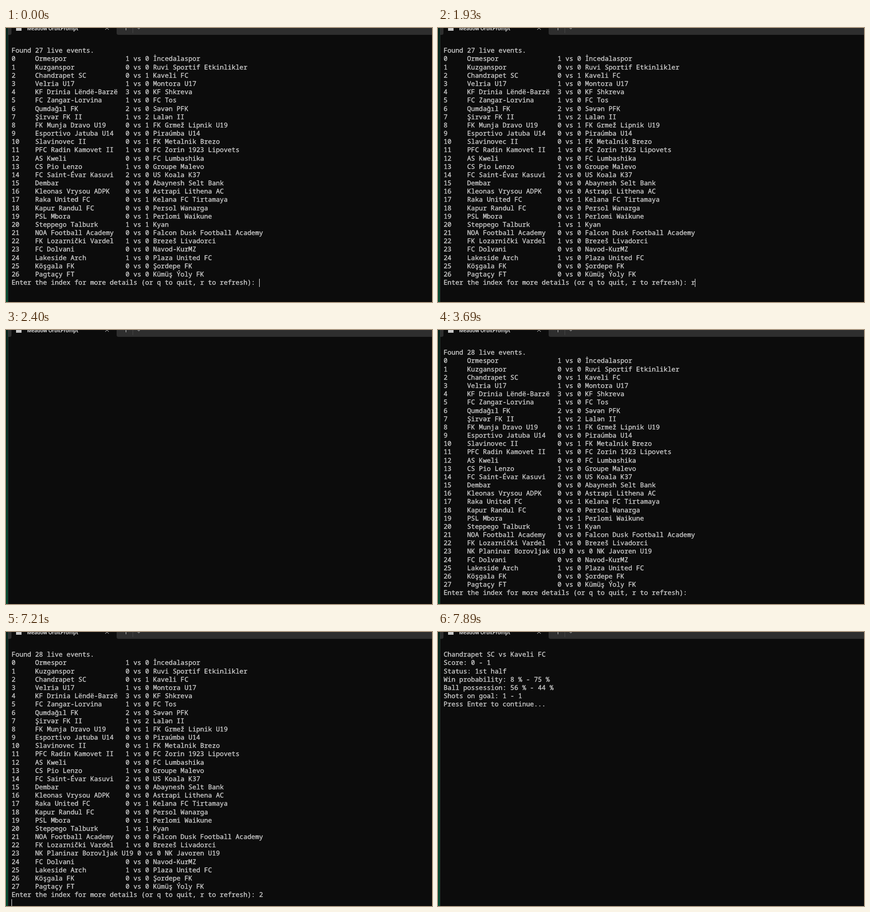
Write an HTML page that moves like this. It is 932 by 601 pixels and loops after 8000 ms.

```html
<!DOCTYPE html>
<html lang="en">
<head>
<meta charset="utf-8">
<title>Live events terminal</title>
<style>
  html, body { margin: 0; width: 100%; height: 100%; overflow: hidden; background: #0c0c0c; }
  #stage { position: relative; width: 932px; height: 601px; overflow: hidden; }
  #chrome { position: absolute; left: 0; top: 0; }
  #screen {
    position: absolute; left: 12.2px; top: 41.3px; margin: 0; color: #ccc;
    font: 14.34px/18.17px "Noto Sans Mono", "DejaVu Sans Mono", monospace;
    -webkit-text-stroke: .4px #ccc;
    text-rendering: geometricPrecision; font-variant-ligatures: none;
  }
  #caret { position: absolute; width: 1px; height: 18px; background: #fff; }
</style>
</head>
<body>
<div id="stage">
  <svg id="chrome" width="932" height="601">
    <defs>
      <linearGradient id="edge" x2="0" y2="1">
        <stop offset="0" stop-color="#04231a"/>
        <stop offset=".35" stop-color="#042c1e"/>
        <stop offset=".6" stop-color="#053c28"/>
        <stop offset="1" stop-color="#044a30"/>
      </linearGradient>
    </defs>
    <rect width="4" height="601" fill="url(#edge)"/>
    <rect x="4" width="1" height="601" fill="#2b3a34"/>
    <path d="M5 0H12V11Q12 15 8 15H5ZM242 0H932V15H246Q242 15 242 11Z" fill="#2e2e2e"/>
    <rect x="22" y="-6" width="12" height="12" fill="#c8c8c8"/>
    <text x="46" y="5" fill="#fff" font-size="10.7" font-weight="600"
      font-family="'Open Sans', 'Noto Sans', sans-serif">Meadow OrbitPrompt</text>
    <g fill="none" stroke="#ddd">
      <path d="M217-4 225 4M225-4 217 4M262.5-4V5M287-1 290.5 2 294-1"/>
      <path d="M277.5 0V11" stroke="#484848"/>
    </g>
  </svg>
  <pre id="screen"></pre>
  <div id="caret"></div>
</div>
<script>
const LOOP = 8000, CELL = 8.603, ROW = 18.17;

const matches = `Ormespor|1 vs 0|İncedalaspor
Kuzganspor|0 vs 0|Ruvi Sportif Etkinlikler
Chandrapet SC|0 vs 1|Kaveli FC
Velria U17|1 vs 0|Montora U17
KF Drinia Lëndë-Barzë|3 vs 0|KF Shkreva
FC Zangar-Lorvina|1 vs 0|FC Tos
Qumdağıl FK|2 vs 0|Səvən PFK
Şirvər FK II|1 vs 2|Lalən II
FK Munja Dravo U19|0 vs 1|FK Grmež Lipnik U19
Esportivo Jatuba U14|0 vs 0|Piraúmba U14
Slavinovec II|0 vs 1|FK Metalnik Brezo
PFC Radin Kamovet II|1 vs 0|FC Zorin 1923 Lipovets
AS Kweli|0 vs 0|FC Lumbashika
CS Pio Lenzo|1 vs 0|Groupe Malevo
FC Saint-Évar Kasuvi|2 vs 0|US Koala K37
Dembar|0 vs 0|Abaynesh Selt Bank
Kleonas Vrysou ADPK|0 vs 0|Astrapi Lithena AC
Raka United FC|0 vs 1|Kelana FC Tirtamaya
Kapur Randul FC|0 vs 0|Persol Wanarga
PSL Mbora|0 vs 1|Perlomi Waikune
Steppego Talburk|1 vs 1|Kyan
NOA Football Academy|0 vs 0|Falcon Dusk Football Academy
FK Lozarnički Vardel|1 vs 0|Brezeš Livadorci
FC Dolvani|0 vs 0|Navod-KurMZ
Lakeside Arch|1 vs 0|Plaza United FC
Köşgala FK|0 vs 0|Şordepe FK
Pagtaçy FT|0 vs 0|Kümüş Ýoly FK`.split("\n");

const lateMatch = "NK Planinar Borovljak U19|0 vs 0|NK Javoren U19";

function listScreen(rows) {
  const lines = rows.map((row, i) => {
    const [home, score, away] = row.split("|");
    return `${String(i).padEnd(6)}${home.padEnd(22)} ${score} ${away}`;
  });
  return [`Found ${rows.length} live events.`, ...lines,
    "Enter the index for more details (or q to quit, r to refresh): "].join("\n");
}

const before = listScreen(matches);
const after = listScreen([...matches.slice(0, 23), lateMatch, ...matches.slice(23)]);
const details = `Chandrapet SC vs Kaveli FC
Score: 0 - 1
Status: 1st half
Win probability: 8 % - 75 %
Ball possession: 56 % - 44 %
Shots on goal: 1 - 1
Press Enter to continue...`;

// Start time and terminal contents; the caret always follows the last character.
const scenes = [
  [0, before], [1930, before + "r"], [2130, ""], [2600, after],
  [6150, after + "2"], [6680, after + "2\n"], [7280, ""], [7350, details]
];

// Times at which the caret switches between shown and hidden.
const blinks = [
  250, 470, 670, 870, 1070, 1270, 1470, 1670, 2400, 2600, 2870, 3080, 3280, 3490,
  3690, 3950, 4165, 4380, 4595, 4810, 5010, 5280, 5480, 5680, 5880, 6080, 6480,
  6680, 7010, 7210, 7420, 7690, 7890
];

const screenEl = document.getElementById("screen");
const caret = document.getElementById("caret");
let shown = null;

function draw(now) {
  const t = now % LOOP;
  const text = scenes.findLast(([start]) => start <= t)[1];
  if (text !== shown) {
    screenEl.textContent = shown = text;
    const lines = text.split("\n");
    caret.style.left = Math.floor(12.4 + lines.at(-1).length * CELL) + "px";
    caret.style.top = Math.round(41 + (lines.length - 1) * ROW) + "px";
  }
  const flips = blinks.filter(time => time <= t).length;
  caret.style.visibility = flips % 2 ? "hidden" : "visible";
}

function tick() {
  draw(performance.now());
  requestAnimationFrame(tick);
}
tick();
</script>
</body>
</html>
```
